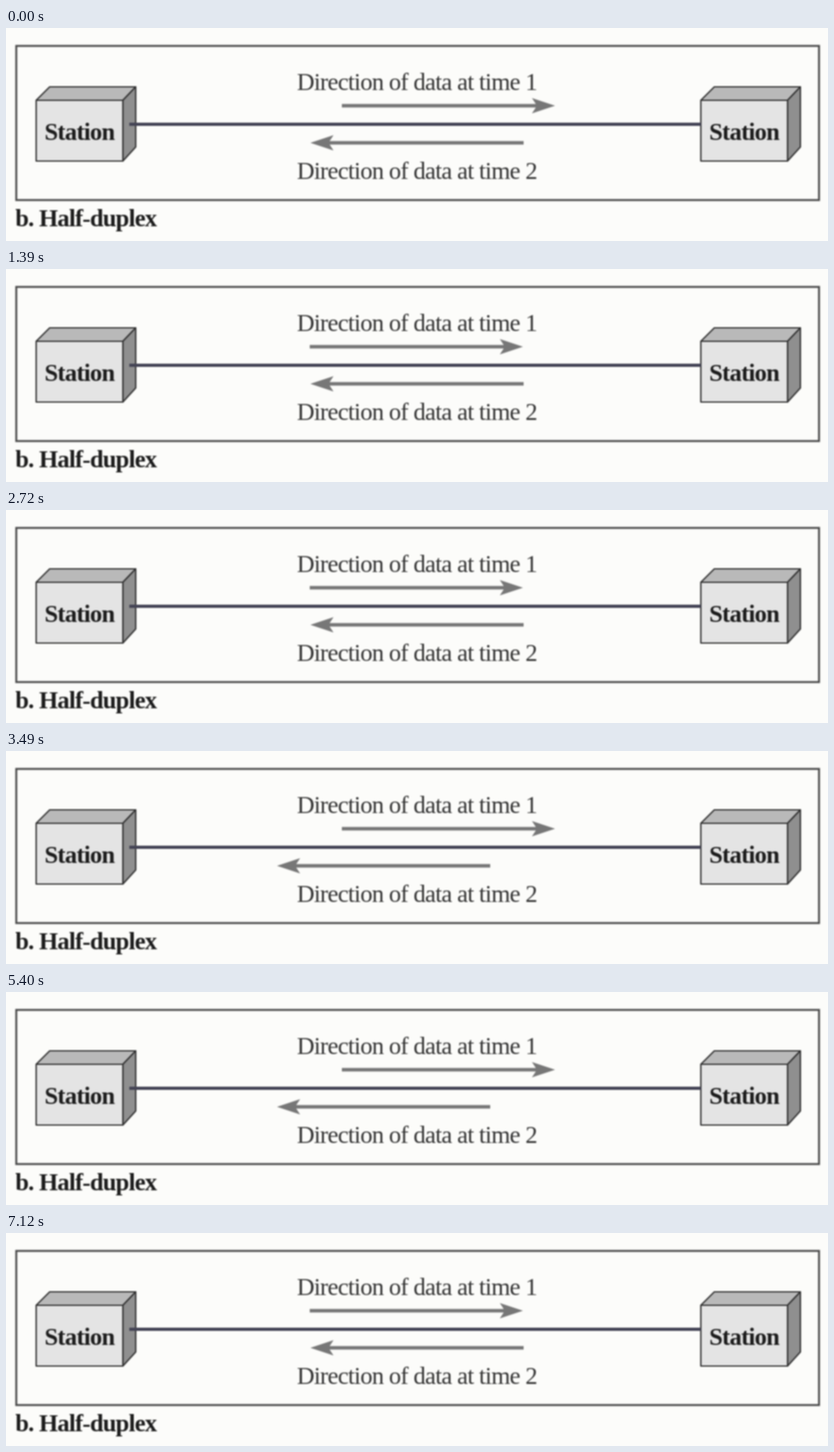
Recreate the animation shown at these times as an HTML page. Size 1280x333 px, loop 7.17 s.

```html
<!DOCTYPE html>
<html lang="en">
<head>
<meta charset="utf-8">
<title>Half-duplex</title>
<style>
  html, body { margin: 0; width: 100%; height: 100%; overflow: hidden; background: #fcfcfa; }
  svg { display: block; width: 100%; height: 100%; filter: blur(.8px); }
  text { font: 38px "Liberation Serif", serif; letter-spacing: -.97px; fill: #333; }
  .bold { font-weight: bold; letter-spacing: -1.05px; fill: #1c1c1c; }
  .box { stroke: #333; stroke-width: 2.2; stroke-linejoin: round; }
</style>
</head>
<body>
<svg viewBox="0 0 1280 333">
  <defs>
    <g id="station">
      <path class="box" fill="#b9b9b9" d="M47 113L68 92H202L182 113Z"/>
      <path class="box" fill="#8f8f8f" d="M182 113L202 92V186L182 208Z"/>
      <path class="box" fill="#e4e4e4" d="M47 113H182V208H47Z"/>
      <text class="bold" x="60" y="175">Station</text>
    </g>
    <path id="arrow" fill="#777" d="M0 -2.7H302L296 -12L332 0L296 12L302 2.7H0Z"/>
  </defs>
  <rect x="16" y="28" width="1250" height="241" fill="none" stroke="#484848" stroke-width="3"/>
  <use href="#station"/>
  <use href="#station" x="1035"/>
  <path d="M192 150.5H1082" stroke="#444455" stroke-width="5.2"/>
  <text x="453" y="97">Direction of data at time 1</text>
  <text x="453" y="236">Direction of data at time 2</text>
  <text class="bold" x="14.5" y="310">b. Half-duplex</text>
  <g id="forward"><use href="#arrow"/></g>
  <g id="back"><use href="#arrow"/></g>
</svg>
<script>
  const LOOP = 7170, STEP = 500, LEAD = 70;
  const forward = document.getElementById("forward");
  const back = document.getElementById("back");

  // Steps: forward arrow sent, back arrow sent, both at rest.
  function draw() {
    const t = performance.now() % LOOP;
    const step = Math.floor((t + LEAD) / STEP) % 3;
    forward.setAttribute("transform", `translate(${step < 2 ? 523 : 473} 121.5)`);
    back.setAttribute("transform", `translate(${step === 1 ? 754 : 806} 179.5) scale(-1 1)`);
    requestAnimationFrame(draw);
  }
  draw();
</script>
</body>
</html>
```
